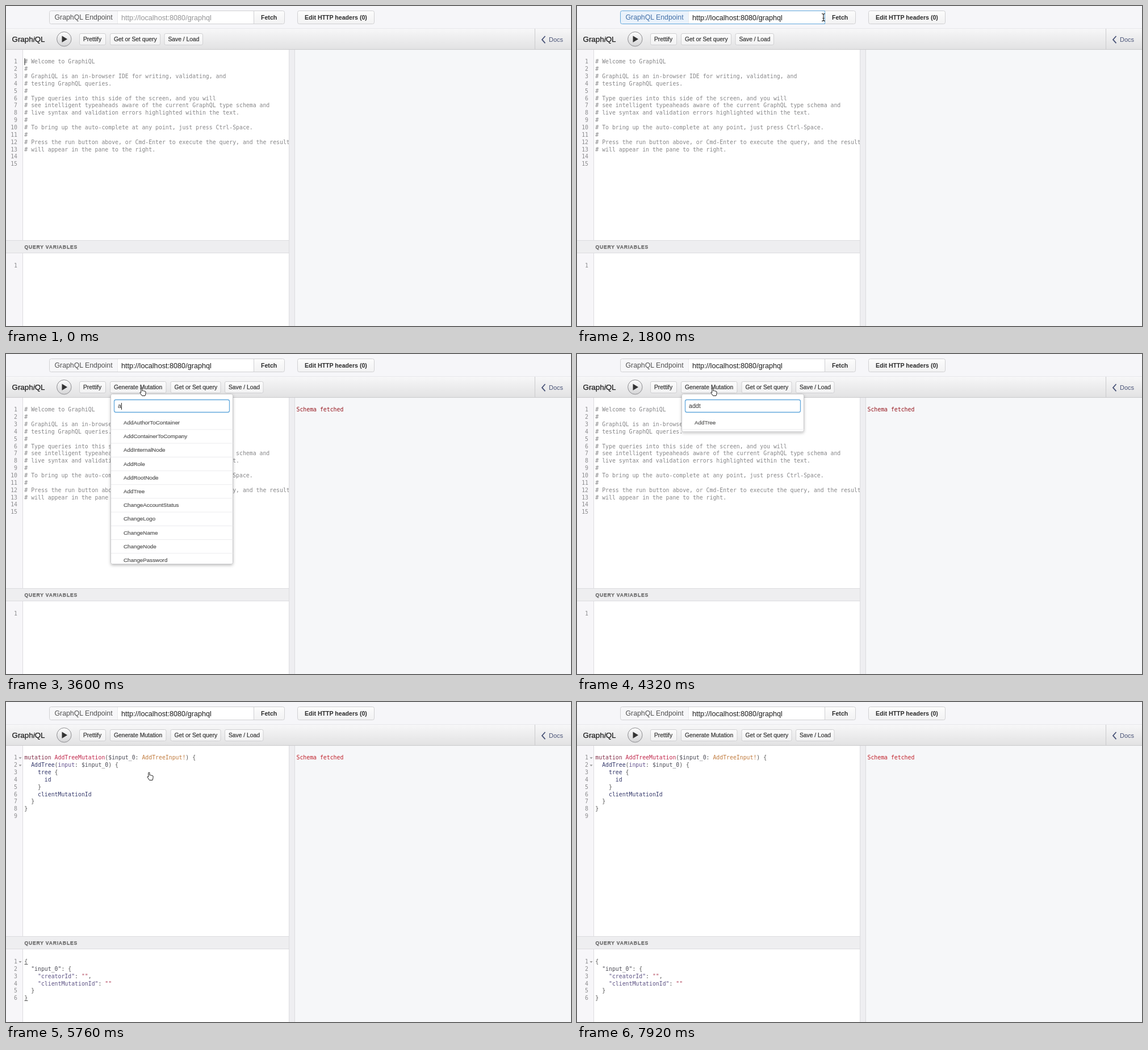
Animation, 995 px wide and 563 px high, one loop 8 s. Source, as an HTML page:

```html
<!DOCTYPE html>
<html lang="en">
<head>
<meta charset="utf-8">
<title>GraphiQL session</title>
<style>
  html, body { margin: 0; width: 100%; height: 100%; overflow: hidden; background: #fff; }
  svg { display: block; width: 995px; height: 563px; }
  text { font-family: "Liberation Sans", Arial, sans-serif; white-space: pre; }
  .code text { font: 9.83px "DejaVu Sans Mono", monospace; }
  .num text { fill: #8c8c8e; text-anchor: end; }
  .comment text { fill: #868688; }
  .bold { font-weight: bold; font-size: 10.6px; fill: #2c2c2c; }
  .tool text { font-size: 10.3px; fill: #303030; stroke: #303030; stroke-width: .2; }
  .tool rect, .button { fill: url(#button); stroke: #d0d0d2; }
  .menu text { font-size: 9.8px; fill: #555; stroke: #555; stroke-width: .2; }
  .menu .active { fill: #fff; stroke: #fff; }
  .edge { stroke: #dcdcdf; }
  .label { font-size: 12.3px; fill: #505050; }
  .focus .label { fill: #4270a8; }
  .focus .addon { fill: #eaf2fb; }
  .focus .outline { stroke: #62a8dc; }
  .key { fill: #84304a; } .def { fill: #c0264a; } .var { fill: #4b4b56; }
  .type { fill: #c07a3c; } .field { fill: #34386a; } .arg { fill: #62508c; }
  .punct { fill: #555; } .prop { fill: #5c5284; } .str { fill: #b04058; }
</style>
</head>
<body>
<svg viewBox="0 0 995 563">
  <defs>
    <linearGradient id="bar" x2="0" y2="1"><stop stop-color="#f7f7f8"/><stop offset="1" stop-color="#e2e2e3"/></linearGradient>
    <linearGradient id="button" x2="0" y2="1"><stop stop-color="#fcfcfc"/><stop offset="1" stop-color="#f2f2f3"/></linearGradient>
    <linearGradient id="round" x2="0" y2="1"><stop stop-color="#fdfdfd"/><stop offset="1" stop-color="#d4d4d6"/></linearGradient>
    <filter id="shadow" x="-10%" y="-10%" width="120%" height="125%"><feDropShadow dx="0" dy="2" stdDeviation="2.5" flood-opacity=".25"/></filter>
    <clipPath id="pane"><path d="M0 77H498V412H0z"/></clipPath>
    <clipPath id="listClip"><rect id="listBox" x="184" y="71" width="216"/></clipPath>
  </defs>

  <path d="M0 0H995V40H0z" fill="#f6f6f9"/>
  <path d="M0 77H29V412H0zM0 435H29V563H0z" fill="#f7f6f9"/>
  <path d="M499 77H509V563H499z" fill="#eeeef1"/>
  <path d="M509 77H995V563H509z" fill="#f6f7f9"/>
  <path class="edge" d="M29.5 77V412M29.5 435V563M498.5 77V563M508.5 77V563" fill="none"/>

  <g id="endpoint">
    <rect x="76.5" y="8.5" width="360" height="23" rx="3" fill="#fff"/>
    <path class="addon" d="M196 9H79.5q-2.5 0-2.5 2.5v17q0 2.5 2.5 2.5H196z" fill="#f7f7f9"/>
    <path d="M196.5 9V31" stroke="#eaeaec"/>
    <path class="button" d="M436.5 8.5H487.5q3 0 3 3V28.5q0 3-3 3H436.5z"/>
    <path class="outline" d="M436.5 8.5H79.5q-3 0-3 3V28.5q0 3 3 3H436.5z" fill="none" stroke="#d0d0d3"/>
    <text class="label" x="85.5" y="24">GraphQL Endpoint</text>
    <text id="url" x="203" y="24.5" font-size="12.65"></text>
    <text class="bold" x="449" y="23.7">Fetch</text>
  </g>
  <rect class="button" x="513.5" y="8.5" width="135" height="23" rx="3"/>
  <text class="bold" x="526" y="23.7">Edit HTTP headers (0)</text>

  <path d="M0 40H995V76H0z" fill="url(#bar)"/>
  <path class="edge" d="M0 39.5H995" stroke-opacity=".5"/>
  <path d="M0 76.5H995M931.5 40V76" stroke="#cbcbcd"/>
  <text x="10.5" y="63.3" font-size="13.4" fill="#1c1c1c" stroke="#1c1c1c" stroke-width=".25">Graph<tspan font-style="italic">i</tspan>QL</text>
  <circle cx="102.3" cy="58.2" r="12.7" fill="url(#round)" stroke="#8d8d90"/>
  <path d="M98.5 52.5L108 58.2 98.5 64z" fill="#333"/>
  <path d="M949.5 53L944 59.2 949.5 65.4" fill="none" stroke="#4a5478" stroke-width="1.8"/>
  <text x="956" y="63" font-size="11" fill="#4a5478">Docs</text>
  <g class="tool" id="tools"></g>

  <g class="code" id="welcome" clip-path="url(#pane)"></g>
  <g class="code" id="mutation"></g>
  <path d="M0 412H498V435H0z" fill="#eeeef0"/>
  <path class="edge" d="M0 412.5H498M0 434.5H498"/>
  <text x="32.5" y="426.8" font-size="8.6" font-weight="bold" letter-spacing=".8" fill="#666" stroke="#666" stroke-width=".25">QUERY VARIABLES</text>
  <g class="code num" id="emptyVars"></g>
  <g class="code" id="variables"></g>
  <path id="brackets" d="M32.5 461.5h6M32.5 525.5h6" stroke="#555"/>
  <g class="code" id="fetched"><text x="511.5" y="101.3">Schema fetched</text></g>

  <g class="menu" id="menu">
    <rect id="menuBox" x="184.5" y="70.5" width="215" rx="3" fill="#fff" stroke="#c8c8ca" filter="url(#shadow)"/>
    <rect x="190.5" y="80.5" width="203" height="22" rx="3" fill="#fff" stroke="#62a8dc" stroke-width="1.3"/>
    <text id="search" x="197" y="95" style="font-size:10.6px;fill:#333;stroke:none"></text>
    <g id="list" clip-path="url(#listClip)"></g>
  </g>
  <path id="caret" stroke="#222"/>
  <g id="ibeam" fill="none" stroke="#222" stroke-width="1.2"><path d="M-3-6.5q3 0 3 2 0-2 3-2M0-5V5.5M-3 6.5q3 0 3-2 0 2 3 2M-1.5 1.5h3"/></g>
  <g id="hand"><path d="M-3.2-6q0-1.2 1.1-1.2T-1-6v4l1.4-.5 1.3.7 1.3-.1 1 .8 1 .3v3.3L4 6.5H-1.5L-5 1.2q-.2-1.5 1.2-.9l.6.7z" fill="#fff" stroke="#222"/></g>
</svg>
<script>
const STEP = 360, LOOP = 8000, ROW = 24.2, LINE = 12.86;
const $ = id => document.getElementById(id);
const show = (id, on) => $(id).style.display = on ? '' : 'none';

const lines = (rows, x, y) =>
  rows.map((row, i) => `<text x="${x}" y="${(y + i * LINE).toFixed(2)}">${row}</text>`).join('');
const numbers = (count, y) =>
  `<g class="num">${lines(Array.from({ length: count }, (_, i) => i + 1), 20, y)}</g>`;
const fold = y => `<path d="M22.5 ${y - 4}h5l-2.5 3z" fill="#999"/>`;
// Colours [class:text] runs.
const paint = row => row.replace(/\[(\w+):([^\]]*)\]/g, '<tspan class="$1">$2</tspan>');
const block = (rows, y, folds) =>
  numbers(rows.length, y) + `<g class="punct">${lines(rows.map(paint), 32.3, y)}</g>` +
  folds.map(i => fold(y + i * LINE)).join('');

const TOP = 101.3, BOTTOM = 460;
$('welcome').innerHTML = numbers(15, TOP) + '<g class="comment">' + lines([
  '# Welcome to GraphiQL',
  '#',
  '# GraphiQL is an in-browser IDE for writing, validating, and',
  '# testing GraphQL queries.',
  '#',
  '# Type queries into this side of the screen, and you will',
  '# see intelligent typeaheads aware of the current GraphQL type schema and',
  '# live syntax and validation errors highlighted within the text.',
  '#',
  '# To bring up the auto-complete at any point, just press Ctrl-Space.',
  '#',
  '# Press the run button above, or Cmd-Enter to execute the query, and the result(s)',
  '# will appear in the pane to the right.'
], 32.3, TOP) + '</g>';

$('mutation').innerHTML = block([
  '[key:mutation] [def:AddTreeMutation]([var:$input_0]: [type:AddTreeInput!]) {',
  '  [field:AddTree]([arg:input]: [var:$input_0]) {',
  '    [field:tree] {',
  '      [field:id]',
  '    }',
  '    [field:clientMutationId]',
  '  }',
  '}',
  ''
], TOP, [0, 1]);

$('emptyVars').innerHTML = numbers(1, BOTTOM);
$('variables').innerHTML = block([
  '{',
  '  [var:"input_0"]: {',
  '    [prop:"creatorId"]: [str:""],',
  '    [prop:"clientMutationId"]: [str:""]',
  '  }',
  '}'
], BOTTOM, [0]);

const tool = (label, x, width) =>
  `<rect x="${x}" y="48.5" width="${width}" height="20" rx="2.5"/><text x="${x + 6.5}" y="62">${label}</text>`;
$('tools').innerHTML = tool('Prettify', 129.5, 46) +
  `<g id="generate">${tool('Generate Mutation', 183.5, 98.5)}</g>` +
  `<g id="rest">${tool('Get or Set query', 183.5, 88)}${tool('Save / Load', 279, 67.5)}</g>`;

const NAMES = ['AddAuthorToContainer', 'AddContainerToCompany', 'AddInternalNode', 'AddRole',
  'AddRootNode', 'AddTree', 'ChangeAccountStatus', 'ChangeLogo', 'ChangeName', 'ChangeNode', 'ChangePassword'];

function drawMenu(query, hover) {
  const found = NAMES.filter(name => name.toLowerCase().includes(query));
  const height = Math.min(299, 42 + found.length * ROW);
  $('search').textContent = query;
  $('menuBox').setAttribute('height', height);
  $('listBox').setAttribute('height', height - 1);
  $('list').innerHTML = found.map((name, i) => {
    const y = 109 + i * ROW;
    const back = hover ? `<path d="M185 ${y}h214.5v23.7h-214.5z" fill="#4175be"/>`
      : `<path d="M185 ${y + 23.9}h214.5" stroke="#ececee"/>`;
    return `${back}<text class="${hover ? 'active' : ''}" x="207" y="${y + 15}">${name}</text>`;
  }).join('');
}

const URL_TEXT = 'http://localhost:8080/graphql';
const typedUrl = [0, 0, 0, 10, 20];
const queries = { 9: '', 10: 'a', 11: 'add', 12: 'addt', 13: 'addtre', 14: 'addtree', 15: 'addtree' };
// Each entry holds from its step until the next one.
const pointers = [[0], [2, 'ibeam', 434, 20], [6, 'hand', 464, 22], [7, 'ibeam', 271, 92.5],
  [8, 'hand', 241, 67], [15, 'hand', 254, 131], [17, 'ibeam', 200, 320], [18, 'ibeam', 147, 488],
  [19, 'ibeam', 142, 483], [20]];

function placeCaret(step) {
  let x, y;
  if (step === 0) [x, y] = [33, 92];
  else if (step === 3 || step === 4) [x, y] = [203.5 + $('url').getComputedTextLength(), 14];
  else if (step >= 9 && step < 15 && step !== 12) [x, y] = [197.5 + $('search').getComputedTextLength(), 86];
  $('caret').setAttribute('d', x ? `M${x} ${y}v12` : '');
}

function draw(step) {
  const typed = typedUrl[step] ?? URL_TEXT.length;
  $('endpoint').setAttribute('class', step >= 2 && step < 6 ? 'focus' : '');
  $('url').textContent = typed ? URL_TEXT.slice(0, typed) : URL_TEXT;
  $('url').setAttribute('fill', typed ? '#1c1c1c' : '#949496');

  const fetched = step >= 7, generated = step >= 16, open = step in queries;
  show('fetched', fetched);
  show('generate', fetched);
  $('rest').setAttribute('transform', `translate(${fetched ? 106.5 : 0})`);
  $('fetched').setAttribute('fill', generated ? '#c0202a' : '#96161e');

  show('menu', open);
  if (open) drawMenu(queries[step], step === 15);
  show('welcome', !generated);
  show('emptyVars', !generated);
  show('mutation', generated);
  show('variables', generated);
  show('brackets', generated && step < 19);

  const [, kind, x, y] = pointers.findLast(p => p[0] <= step);
  for (const id of ['ibeam', 'hand']) {
    show(id, id === kind);
    if (id === kind) $(id).setAttribute('transform', `translate(${x} ${y})`);
  }
  placeCaret(step);
}

let shown = -1;
function tick() {
  const step = Math.floor(performance.now() % LOOP / STEP);
  if (step !== shown) draw(shown = step);
  requestAnimationFrame(tick);
}
tick();
</script>
</body>
</html>
```
